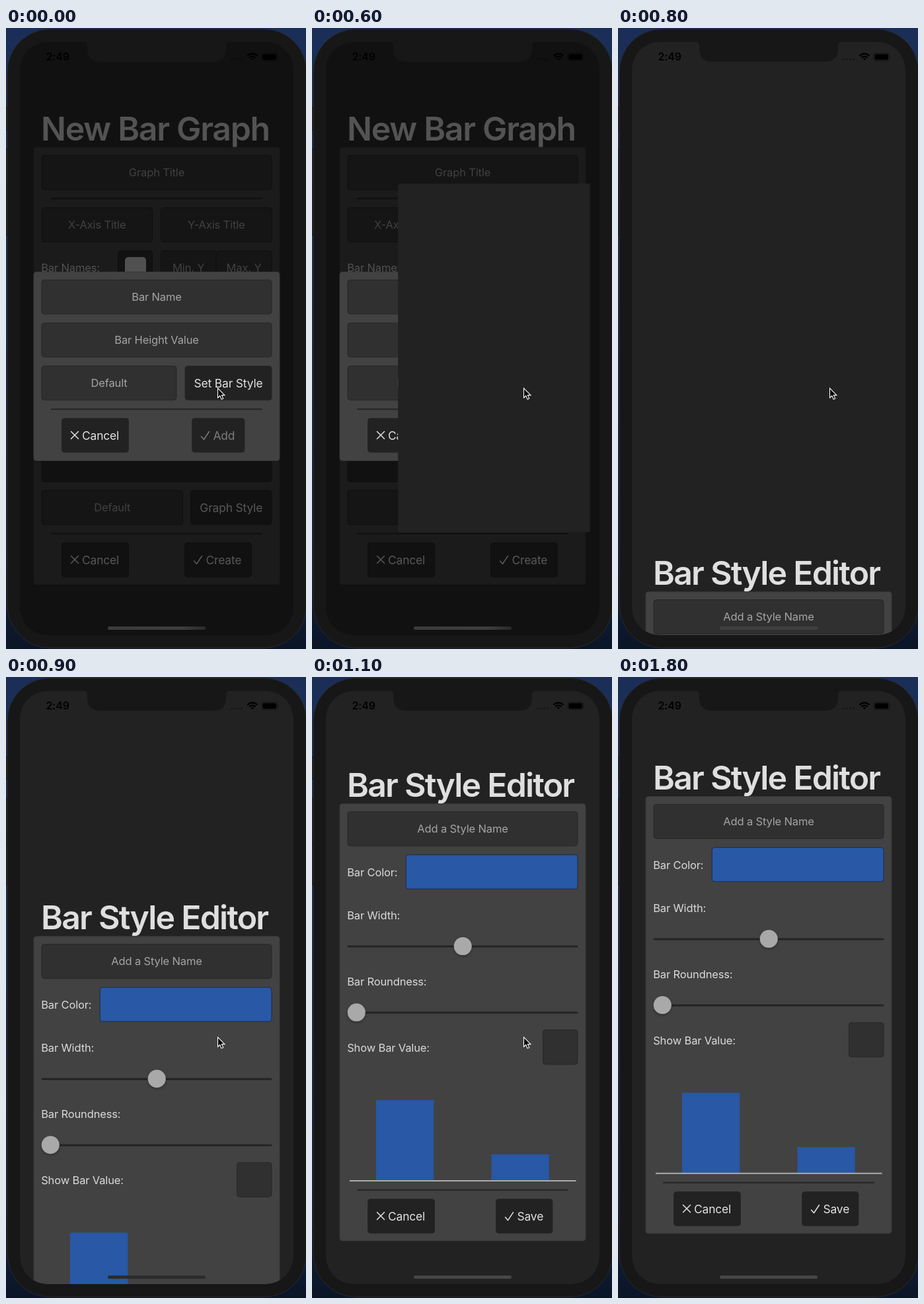
Write an HTML page that moves like this. It is 454 px wide and 938 px high and loops after 2.1 s.

```html
<!DOCTYPE html>
<html lang="en">
<head>
<meta charset="utf-8">
<title>Bar style editor</title>
<style>
  html, body { margin: 0; width: 100%; height: 100%; overflow: hidden; background: #101a30; }
  svg { display: block; width: 454px; height: 938px; }
  text {
    font: 400 16.5px Inter, "Liberation Sans", sans-serif;
    font-optical-sizing: none;
    letter-spacing: -.15px;
    white-space: pre;
  }
  .title { font-size: 50px; font-weight: 600; letter-spacing: -1.3px; }
  .tight { letter-spacing: -1.8px; }
  .action { font-size: 17.4px; }
  .clock { font-size: 16px; font-weight: 600; }
  .mid { text-anchor: middle; }
  .icon { fill: none; stroke-width: 1.5; stroke-linecap: round; stroke-linejoin: round; }
</style>
</head>
<body>
<svg viewBox="0 0 454 938">
  <defs>
    <linearGradient id="sky" x2="0" y2="1">
      <stop offset="0" stop-color="#1a2e58"/>
      <stop offset=".4" stop-color="#193354"/>
      <stop offset=".85" stop-color="#12233d"/>
      <stop offset="1" stop-color="#0b1528"/>
    </linearGradient>
    <linearGradient id="homeFade">
      <stop offset="0" stop-color="#3c3c3c"/>
      <stop offset=".75" stop-color="#3e3e3e"/>
      <stop offset="1" stop-color="#2a2a2a"/>
    </linearGradient>
    <filter id="soft" x="-50%" y="-50%" width="200%" height="200%">
      <feDropShadow dx="0" dy="2" stdDeviation="2" flood-opacity=".3"/>
    </filter>
    <clipPath id="screen"><rect x="21" y="21" width="414" height="896" rx="42"/></clipPath>
  </defs>

  <rect width="454" height="938" fill="url(#sky)"/>
  <path d="M0 120h4v34h-4zM0 183h4v130h-4z" fill="#202020"/>
  <path d="M0 120.5h4M0 154.5h4M0 183h4M0 243h4M0 252h4M0 313h4M0 836h4" stroke="#0a0a0a"/>
  <rect x="2" y="1.5" width="453" height="935" rx="65" fill="#171717" stroke="#292a2d"/>

  <g clip-path="url(#screen)">
    <rect x="21" y="21" width="414" height="896" fill="#111"/>
    <g id="form"></g>
    <g id="modal"></g>
    <rect id="sheet" rx="3" fill="#222"/>
    <g id="editor"></g>
  </g>

  <path d="M117 20.500q6 .5 6 7v3.500q0 20 20 20h170q20 0 20-20v-3.500q0-6.500 6-7z" fill="#171717"/>
  <text class="clock" x="60.500" y="49">2:49</text>
  <path d="M340 47.500h18" stroke="#000" stroke-width="2.500" stroke-dasharray="3 2" opacity=".3"/>
  <g fill="none" stroke="#000" stroke-width="2.300">
    <path d="M365.500 42.200q7.500-6.800 15 0M368.200 45q4.800-4.200 9.600 0"/>
    <path d="M373 49l-2.300-2.500q2.300-1.800 4.600 0z" fill="#000" stroke="none"/>
  </g>
  <rect x="387" y="38" width="23.500" height="11.500" rx="3.500" fill="none" stroke="#000" opacity=".4"/>
  <rect x="388.500" y="39.500" width="20.500" height="8.500" rx="2"/>
  <path d="M411.500 42q2 1.800 0 3.600z" opacity=".5"/>
  <rect id="home" x="154" y="904" width="148" height="5" rx="2.500"/>
  <path id="cursor" d="M0 0v14.500l3.300-3 2.300 5.400 2.600-1.100-2.300-5.200h4.500z"
        fill="#000" stroke="#fff" stroke-width="1.100"/>
</svg>

<script>
const $ = id => document.getElementById(id);

const rect = (x, y, r, b, fill, extra = '') =>
  `<rect x="${x}" y="${y}" width="${r - x}" height="${b - y}" fill="${fill}" ${extra}/>`;
const box = (x, y, r, b, fill, edge) =>
  rect(x + .5, y + .5, r - .5, b - .5, fill, `rx="4" stroke="${edge}"`);
const text = (s, x, y, fill, cls = '') =>
  `<text x="${x}" y="${y}" fill="${fill}" class="${cls}">${s}</text>`;
const line = (x, r, y, color, w, cap = 'round') =>
  `<path d="M${x} ${y}H${r}" stroke="${color}" stroke-width="${w}" stroke-linecap="${cap}"/>`;

// Controls for one colour theme; rows are 52 px tall.
const kit = c => ({
  panel: (y, b) => rect(42, y, 414, b, c.panel, `rx="4" stroke="${c.rim}"`),
  field: (s, x, y, r) => box(x, y, r, y + 52.5, c.field, c.edge) +
    text(s, (x + r) / 2, y + 32, c.hint, 'mid'),
  label: (s, y) => text(s, 53.2, y + 6, c.label),
  rule: y => line(69, 387, y, c.rule, 2),
  button: (s, x, y, r) => box(x, y, r, y + 52.5, c.button, c.edge) +
    text(s, (x + r) / 2, y + 32.5, c.text, 'action mid'),
  iconButton(s, x, y, r, ok, ink = c.text) {
    const icon = ok ? 'm14.500 28 4 4.500 8-12' : 'm14.500 20.500 11 11m0-11-11 11';
    return box(x, y, r, y + 52.5, c.button, c.edge) +
      `<path class="icon" stroke="${ink}" d="M${x} ${y}${icon}"/>` +
      text(s, x + (ok ? 32.5 : 31), y + 32.5, ink, 'action');
  }
});

const dim = kit({ panel: '#1b1b1b', rim: '#181818', field: '#151515', edge: '#0e0e0e',
  button: '#111', hint: '#414141', label: '#505050', text: '#585858', rule: '#0f0f0f' });
const lit = kit({ panel: '#424242', rim: '#393939', field: '#303030', edge: '#262626',
  button: '#222', hint: '#a4a4a4', label: '#dadada', text: '#e2e2e2', rule: '#242424' });

const blue = '#2858a6';

$('form').innerHTML =
  text('New Bar Graph', 53, 170, '#535353', 'title') +
  dim.panel(180.5, 840.5) +
  dim.field('Graph Title', 53.5, 192, 402.5) +
  dim.rule(257.5) +
  dim.field('X-Axis Title', 53.5, 271, 222) +
  dim.field('Y-Axis Title', 234, 271, 402.5) +
  dim.label('Bar Names:', 362) +
  box(169, 336, 222, 388, '#121212', '#0e0e0e') +
  rect(180, 346, 212, 378, '#505050', 'rx="5"') +
  dim.field('Min. Y', 234, 336, 318.5) +
  dim.field('Max. Y', 317.5, 336, 402.5) +
  box(53.5, 600, 402.5, 686, '#111', '#0e0e0e') +
  dim.field('Default', 53.5, 698, 268) +
  dim.button('Graph Style', 279, 698, 402.5) +
  dim.rule(763.7) +
  dim.iconButton('Cancel', 84, 777, 186) +
  dim.iconButton('Create', 270, 777, 372, true);

$('modal').innerHTML =
  lit.panel(368.5, 653.5) +
  lit.field('Bar Name', 53.5, 380, 402.5) +
  lit.field('Bar Height Value', 53.5, 445, 402.5) +
  lit.field('Default', 53.5, 510, 258.5) +
  lit.button('Set Bar Style', 270.5, 510, 402.5) +
  lit.rule(575.7) +
  lit.iconButton('Cancel', 84, 589, 186) +
  lit.iconButton('Add', 281, 589, 361.5, true, '#7c7c7c');

const slider = (y, x) => line(55, 401, y, '#242424', 3) +
  `<circle cx="${x}" cy="${y - .5}" r="13.500" fill="#a9a9a9" filter="url(#soft)"/>`;

$('editor').innerHTML =
  text('Bar Style Editor', 53, 170, '#dfdfdf', 'title tight') +
  lit.panel(180.5, 840.5) +
  lit.field('Add a Style Name', 53.5, 192, 402.5) +
  lit.label('Bar Color:', 283.5) +
  box(141.7, 257, 402.5, 309.5, blue, '#1c2c48') +
  lit.label('Bar Width:', 348.5) + slider(396, 228.2) +
  lit.label('Bar Roundness:', 448.5) + slider(496, 67.3) +
  lit.label('Show Bar Value:', 548.5) +
  box(349, 521.5, 402.5, 574.5, '#303030', '#262626') +
  rect(97, 628, 184.3, 749, blue) +
  rect(271.5, 710, 358.7, 749, blue) +
  line(57, 399.5, 749.8, '#acacac', 2, 'butt') +
  lit.rule(763.7) +
  lit.iconButton('Cancel', 84, 777, 186) +
  lit.iconButton('Save', 278, 777, 364.5, true);

const LOOP = 2100, TICK = 100;
const clamp = v => Math.min(1, Math.max(0, v));
const mix = (a, b, p) => a + (b - a) * p;
const ease = k => (1 - Math.cos(Math.PI * clamp(k))) / 2;
const show = (el, on) => el.setAttribute('visibility', on ? 'visible' : 'hidden');
const move = (el, x, y) => el.setAttribute('transform', `translate(${x} ${y})`);

// The button grows into a full-screen sheet.
function drawSheet(t) {
  const sheet = $('sheet'), p = ease((t - 370) / 426);
  show(sheet, t >= 300);
  const place = {
    x: mix(270.5, 21, p), y: mix(510, 21, p),
    width: mix(132, 414, p), height: mix(52, 896, p)
  };
  for (const key in place) sheet.setAttribute(key, place[key]);
}

// The editor rises on a critically damped spring.
function drawEditor(t) {
  const x = Math.max(0, t - 747) * .0181;
  show($('editor'), t > 747);
  move($('editor'), 0, t < 1300 ? 894 * (1 + x) * Math.exp(-x) : 0);
}

function drawCursor(t) {
  const p = ease((t - 1400) / 300);
  show($('cursor'), t < 1800);
  move($('cursor'), mix(320.5, 263.5, p), mix(544, 749, p));
}

function homeColor(t) {
  if (t < 800) return 'url(#homeFade)';
  if (t < 900) return '#404040';
  return t < 1100 ? '#2c2c2c' : '#464646';
}

function frame(now) {
  const t = Math.floor(now % LOOP / TICK) * TICK;
  drawSheet(t);
  drawEditor(t);
  drawCursor(t);
  $('home').setAttribute('fill', homeColor(t));
}

let start;
function loop(now) {
  start ??= now;
  frame(now - start);
  requestAnimationFrame(loop);
}
frame(0);
requestAnimationFrame(loop);
</script>
</body>
</html>
```
